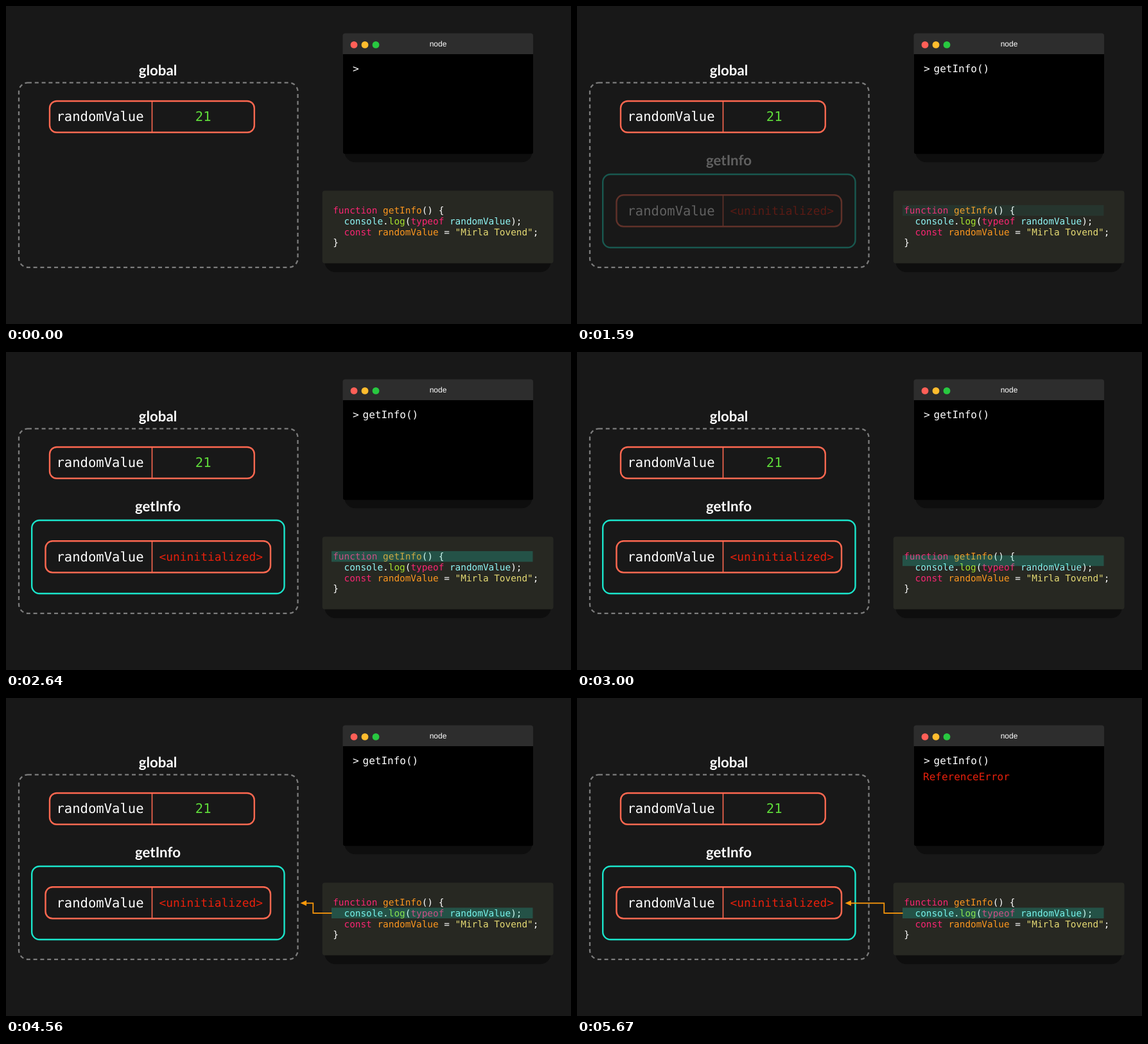
Write an HTML page that moves like this. It is 880 by 495 pixels and loops after 8220 ms.

```html
<!DOCTYPE html>
<html lang="en">
<head>
<meta charset="utf-8">
<title>Temporal dead zone</title>
<style>
  html, body { margin: 0; width: 100%; height: 100%; overflow: hidden; background: #181818; }
  svg { display: block; width: 100vw; height: 100vh; }
  text { white-space: pre; fill: #fff; text-rendering: geometricPrecision;
         font-family: "DejaVu Sans Mono", monospace; }
  .title { font: 700 22.3px Lato, sans-serif; text-anchor: middle; }
  .name { font-size: 20.55px; }
  .term { font-size: 16px; }
  .code { font-size: 14.38px; }
  .box { fill: none; stroke: #ff6850; stroke-width: 2.4; }
  .thin { stroke-width: 1.6; }
  .shadow { fill: #0e0e0e; }
  .error { fill: #e8200c; }
  .key { fill: #f92672; }
  .def { fill: #fd971f; }
  .var { fill: #8ff5f5; }
  .fn { fill: #a6e22e; }
  .str { fill: #e6db74; }
</style>
</head>
<body>
<svg viewBox="0 0 880 495">
  <rect width="880" height="495" fill="#181818"/>

  <text class="title" x="236.5" y="108.3">global</text>
  <rect x="20" y="119.3" width="434.5" height="287.5" rx="14" fill="none"
        stroke="#7c7c7c" stroke-width="2.3" stroke-dasharray="6 4.8"/>
  <rect class="box" x="68" y="148" width="318.8" height="48.8" rx="11"/>
  <path class="box thin" d="M227.5 148V197"/>
  <text class="name" x="78.5" y="179.4">randomValue</text>
  <text class="name" x="294.8" y="179.4" style="fill:#5fdd3a">21</text>

  <g id="scope">
    <text class="title" x="236.5" y="248.3">getInfo</text>
    <rect class="box" x="40.2" y="262" width="393.3" height="114" rx="12" style="stroke:#1ae5cb"/>
    <rect class="box" x="61.5" y="294.3" width="350.5" height="49" rx="11"/>
    <path class="box thin" d="M227.5 294V343"/>
    <text class="name" x="78.5" y="325.9">randomValue</text>
    <text class="error" x="238.5" y="325" font-size="17.9">&lt;uninitialized&gt;</text>
  </g>

  <rect class="shadow" x="527.5" y="200" width="292" height="43.3" rx="16"/>
  <rect x="525" y="60" width="296" height="170.3" rx="3"/>
  <path d="M524.5 75V46.5a4 4 0 0 1 4-4H817a4 4 0 0 1 4 4V75z" fill="#2d2d2d"/>
  <circle cx="542" cy="60.4" r="5.4" fill="#ff5f57"/>
  <circle cx="559" cy="60.4" r="5.4" fill="#febc2e"/>
  <circle cx="576" cy="60.4" r="5.4" fill="#28c840"/>
  <text x="673" y="63" text-anchor="middle"
        style="font:12px 'Liberation Sans',sans-serif">node</text>
  <text class="term" x="540" y="102.5">&gt;</text>
  <text class="term" id="command" x="555.5" y="102.5"></text>
  <text class="term error" id="error" x="539" y="128">ReferenceError</text>

  <rect class="shadow" x="496.5" y="370" width="352" height="44.3" rx="16"/>
  <rect x="492.7" y="287.5" width="359.8" height="113" rx="4" fill="#272822"/>
  <g class="code">
    <text x="509.2" y="323.2"><tspan class="key">function</tspan> <tspan class="def">getInfo</tspan>() {</text>
    <text x="509.2" y="340">  <tspan class="var">console</tspan>.<tspan class="fn">log</tspan>(<tspan class="key">typeof</tspan> <tspan class="var">randomValue</tspan>);</text>
    <text x="509.2" y="357">  <tspan class="key">const</tspan> <tspan class="def">randomValue</tspan> = <tspan class="str">"Mirla Tovend"</tspan>;</text>
    <text x="509.2" y="373.4">}</text>
  </g>
  <rect id="highlight" x="507" width="313.5" height="16.6" fill="#1de9c9"/>

  <g id="arrow">
    <path id="line" d="M507.5 334.8H478.3V319.3H417.5" fill="none" stroke="#ff9a0a" stroke-width="1.7"/>
    <path id="head" d="M0 0L-9.5 -4.2V4.2z" fill="#ff9a0a"/>
  </g>
</svg>
<script>
  const LOOP = 8220;
  const COMMAND = "getInfo()";
  const el = id => document.getElementById(id);
  const [scope, command, error, highlight, arrow, line, head] =
    ["scope", "command", "error", "highlight", "arrow", "line", "head"].map(el);
  const lineLength = line.getTotalLength();

  // Smooth progress from 0 to 1 between two times.
  function ease(t, start, end) {
    const p = Math.min(1, Math.max(0, (t - start) / (end - start)));
    return p * p * (3 - 2 * p);
  }

  function drawArrow(progress) {
    arrow.style.display = progress > 0 ? "" : "none";
    const length = progress * lineLength;
    const tip = line.getPointAtLength(length);
    const back = line.getPointAtLength(Math.max(0, length - 1));
    const angle = progress > 0 ? Math.atan2(tip.y - back.y, tip.x - back.x) * 180 / Math.PI : 180;
    line.setAttribute("stroke-dasharray", `${Math.max(0, length - 6)} 999`);
    head.setAttribute("transform", `translate(${tip.x} ${tip.y}) rotate(${angle})`);
  }

  function render(t) {
    const typed = Math.max(0, Math.floor((t - 420) / 90) + 1);
    command.textContent = COMMAND.slice(0, typed);

    const shown = ease(t, 1275, 2130);
    scope.setAttribute("opacity", shown);
    highlight.setAttribute("opacity", 0.22 * shown);
    highlight.setAttribute("y", 309.9 + 16.5 * ease(t, 2610, 3510));

    drawArrow(ease(t, 4130, 4880));
    error.setAttribute("opacity", ease(t, 5340, 5670));
  }

  const begin = performance.now();
  function tick() {
    render((performance.now() - begin) % LOOP);
    requestAnimationFrame(tick);
  }
  tick();
</script>
</body>
</html>
```
